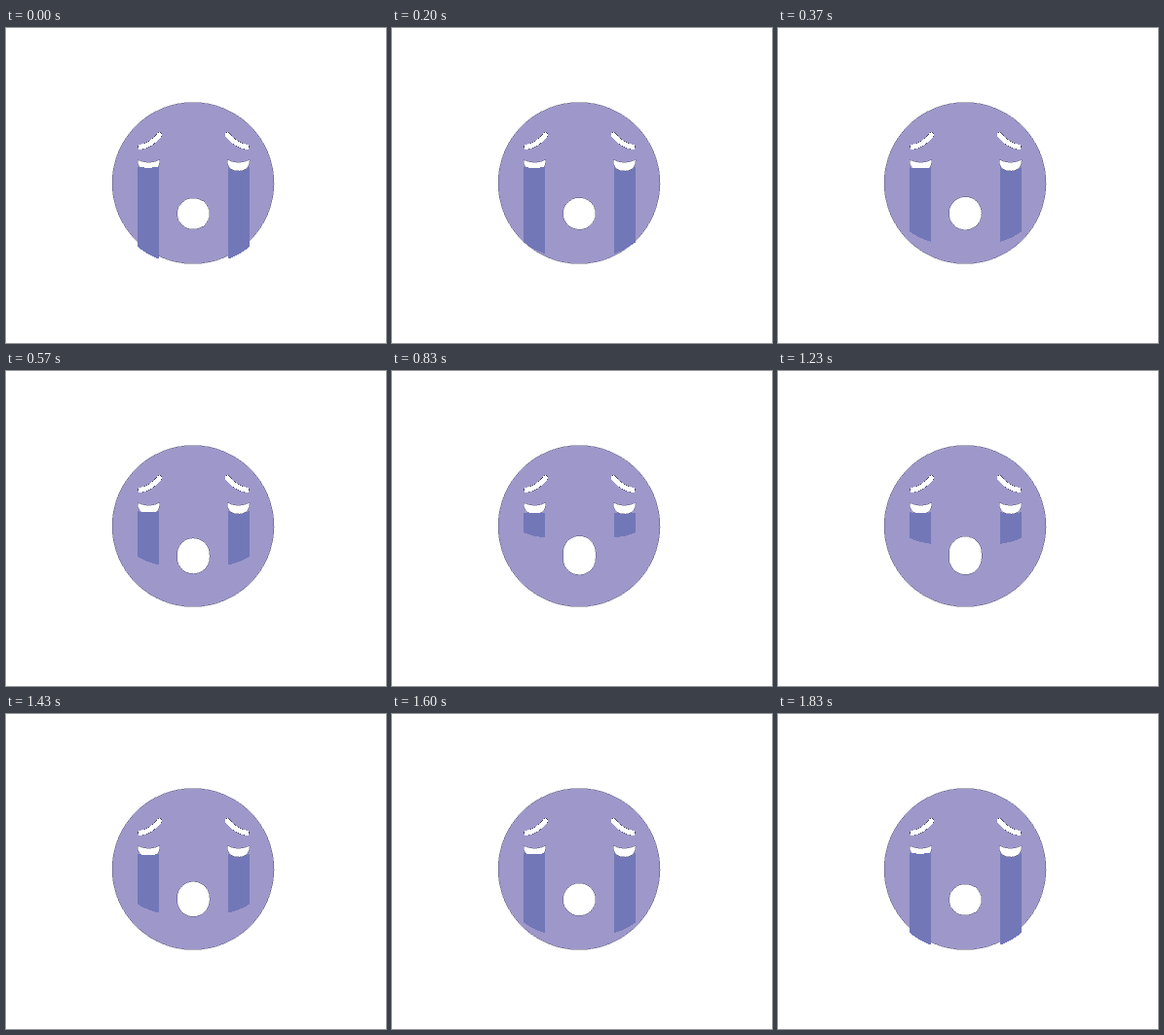
These frames come from a looping animation (390x324 px, 2010 ms). An HTML page:

```html
<!DOCTYPE html>
<html lang="en">
<head>
<meta charset="utf-8">
<title>Crying face</title>
<style>
  html, body { margin: 0; width: 100%; height: 100%; overflow: hidden; background: #fff; }
  svg { display: block; width: 390px; height: 324px; shape-rendering: crispEdges; }

  .face { fill: #9d98c9; stroke: #45425e; stroke-width: .4; }
  .brow { fill: none; stroke: #fff; stroke-width: 5; stroke-linecap: round; }
  .browEdge { fill: none; stroke: #45425e; stroke-width: 5.5; stroke-linecap: round; }
  .eye, .mouth { fill: #fff; stroke: #45425e; stroke-width: .4; }
  .tear { fill: #7277b8; animation: flow 2010ms infinite; }
  .mouth { animation: wail 2010ms infinite; }

  /* Shrink until 1000 ms, grow back until 1830 ms, then rest. */
  @keyframes flow {
    0% {
      d: path("M135 142.5 Q146 145 157 142.5 L157 237.5 Q145 233.5 135 225 Z");
      animation-timing-function: cubic-bezier(.42, 0, .75, 1);
    }
    49.75% {
      d: path("M135 146 Q146 147 157 146 L157 163 Q145 162 135 158.6 Z");
      animation-timing-function: cubic-bezier(.333, 0, .62, 1);
    }
    91.04%, 100% {
      d: path("M135 142.5 Q146 145 157 142.5 L157 237.5 Q145 233.5 135 225 Z");
    }
  }
  @keyframes wail {
    0% {
      y: 175px; height: 32px;
      animation-timing-function: cubic-bezier(.42, 0, .75, 1);
    }
    49.75% {
      y: 169px; height: 41px;
      animation-timing-function: cubic-bezier(.333, 0, .62, 1);
    }
    91.04%, 100% { y: 175px; height: 32px; }
  }
</style>
</head>
<body>
<svg viewBox="0 0 390 324">
  <defs>
    <g id="brow">
      <path class="browEdge" d="M138 122.5 Q149.5 120.5 157.5 110"/>
      <path class="brow" d="M138 122.5 Q149.5 120.5 157.5 110"/>
    </g>
    <path id="eye" class="eye" d="M135 135.5 Q146.5 141 157.8 135.5 Q158.3 147 146.5 147 Q135 147 135 135.5 Z"/>
  </defs>
  <circle class="face" cx="192" cy="159.5" r="83"/>
  <!-- The left tear lies over its eye, the right one under it. -->
  <g>
    <use href="#brow"/>
    <use href="#eye"/>
    <path class="tear"/>
  </g>
  <g transform="translate(385 0) scale(-1 1)">
    <use href="#brow"/>
    <path class="tear"/>
    <use href="#eye"/>
  </g>
  <rect class="mouth" x="175.5" y="175" width="33.5" height="32" rx="16.75" ry="16.75"/>
</svg>
</body>
</html>
```
